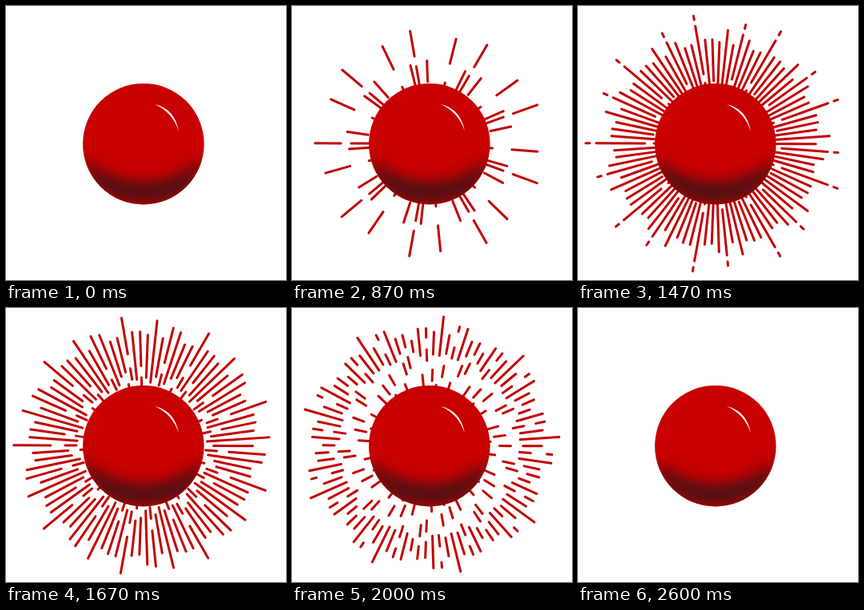
An HTML page with a canvas for the animation above (3.07 s loop, 350 by 343 pixels).

```html
<!DOCTYPE html>
<html lang="en">
<head>
<meta charset="utf-8">
<title>Button burst</title>
<style>
  html, body { margin: 0; width: 100%; height: 100%; overflow: hidden; background: #fff; }
  canvas { display: block; }
</style>
</head>
<body>
<canvas id="stage" width="350" height="343"></canvas>
<script>
const ctx = document.getElementById('stage').getContext('2d');
const LOOP = 3070, START = 530, STEP = 1000 / 15, LAST_STEP = 31;
const CENTER = { x: 172, y: 172.3 };
const BALL_RADIUS = 75.8;
const HIDDEN = 70; // rays start from here, under the ball

// Lanes lie 4 degrees apart and repeat around the ball; they fire in this order.
const REPEATS = 9, LANE_ANGLE = 4, FIRST_ANGLE = 2.2;
const FIRING_ORDER = [7, 3, 9, 6, 5, 2, 0, 8, 4, 1];

const clamp = u => Math.max(0, Math.min(1, u));
const progress = (step, from, to) => clamp((step - from) / (to - from));
const easeOut = (u, power) => 1 - (1 - u) ** power;

// The first and last lanes to fire reach farthest.
const reachOf = rank => 140 + 1.1 * (rank - 4.5) ** 2;

// Three dashes leave each lane: a quick one, a long one and a short follow-up.
function dashesAt(rank, step) {
  const reach = reachOf(rank);
  const travel = u => HIDDEN + (reach - HIDDEN) * u;

  const delay = Math.min(6, 2.3 * Math.floor(rank / 2));
  const quickHead = reach * easeOut(progress(step, delay - 1.4, delay + 14.1), 4);
  const quickTail = quickHead - 32 + 2.5 * delay + 9 * Math.max(0, step - 11);

  const longStart = Math.min(5, 2 + 2 * rank);
  const longHead = travel(easeOut(progress(step, longStart, longStart + 14), 1.5));
  const longTail = travel(progress(step, 12 + 0.4 * rank, 22 + 0.8 * rank));

  const lastHead = HIDDEN + 7 * (step - 13 - 0.9 * rank);

  return [
    [quickTail, quickHead],
    [longTail, Math.min(longHead, quickTail - 8)],
    [lastHead - 14, Math.min(lastHead, longTail - 8)]
  ].map(([tail, head]) => [Math.max(tail, HIDDEN), Math.min(head, reach)])
    .filter(([tail, head]) => head > tail);
}

function addRay(degrees, inner, outer) {
  const angle = degrees * Math.PI / 180;
  const dx = Math.sin(angle), dy = -Math.cos(angle);
  ctx.moveTo(CENTER.x + dx * inner, CENTER.y + dy * inner);
  ctx.lineTo(CENTER.x + dx * outer, CENTER.y + dy * outer);
}

function drawRays(step) {
  ctx.strokeStyle = '#c20000';
  ctx.lineWidth = 3;
  ctx.lineCap = 'round';
  ctx.beginPath();
  FIRING_ORDER.forEach((lane, rank) => {
    for (const [inner, outer] of dashesAt(rank, step)) {
      for (let n = 0; n < REPEATS; n++) {
        addRay(FIRST_ANGLE + lane * LANE_ANGLE + n * 360 / REPEATS, inner, outer);
      }
    }
  });
  ctx.stroke();
}

function fillCrescent(path, color, blur) {
  ctx.filter = `blur(${blur}px)`;
  ctx.fillStyle = color;
  ctx.fill(new Path2D(path));
  ctx.filter = 'none';
}

function drawBall() {
  ctx.save();
  ctx.beginPath();
  ctx.arc(171.8, 172.7, BALL_RADIUS, 0, 2 * Math.PI);
  ctx.fillStyle = '#c80000';
  ctx.fill();
  ctx.clip();
  fillCrescent('M97 191 Q172 249 247 191 Q234 247 172 247 Q110 247 97 191 Z', 'rgba(62,18,22,.85)', 8);
  ctx.restore();
  fillCrescent('M186 123 Q211 129 216 157 Q208.5 133 186 123 Z', '#fff', 0.4);
}

function render(now) {
  const time = now % LOOP;
  const step = Math.floor((time - START) / STEP + 0.05);
  ctx.fillStyle = '#fff';
  ctx.fillRect(0, 0, 350, 343);
  if (step >= 0 && step < LAST_STEP) drawRays(step);
  drawBall();
}

const origin = performance.now();
function tick() {
  render(performance.now() - origin);
  requestAnimationFrame(tick);
}
tick();
</script>
</body>
</html>
```
